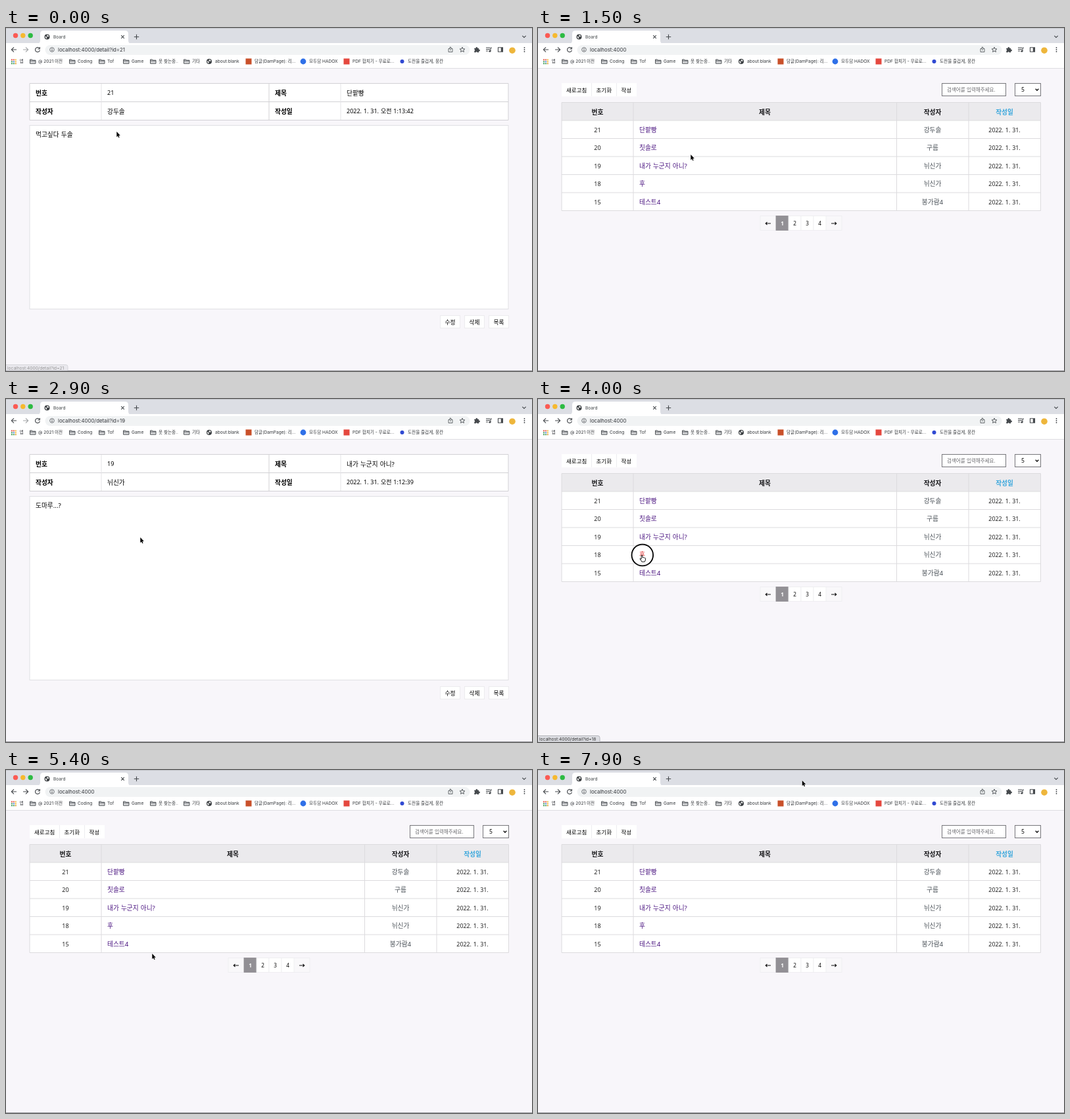
These frames come from a looping animation (800 px wide and 523 px high, 8 s). An HTML page:

```html
<!DOCTYPE html>
<html lang="ko">
<head>
<meta charset="utf-8">
<title>Board</title>
<style>
  html, body { margin: 0; height: 100%; overflow: hidden; background: #f8f6fa; }
  svg { display: block; width: 800px; height: 523px; }
  text { font-family: 'Noto Sans', 'Noto Sans CJK KR', sans-serif; white-space: pre; word-spacing: .06em; }
  .ui { font-family: Inter, 'Noto Sans CJK KR', sans-serif; word-spacing: 0; }
  .line { fill: none; stroke: #45494d; stroke-width: 1.1; }
</style>
</head>
<body>
<svg id="stage" viewBox="0 0 800 523"></svg>
<script>
const LOOP = 8000, STEP = 100;
const posts = [
  { id: 21, title: '단팥빵', author: '강두솔', time: '1:13:42', body: '먹고싶다 두솔' },
  { id: 20, title: '칫솔로', author: '구름', time: '1:13:10', body: '칫솔' },
  { id: 19, title: '내가 누군지 아니?', author: '뉘신가', time: '1:12:39', body: '도마루...?' },
  { id: 18, title: '후', author: '뉘신가', time: '1:12:05', body: '후' },
  { id: 15, title: '테스트4', author: '봉가람4', time: '1:05:47', body: '졸려요4' },
];

// [time, post id], 0 is the list
const visits = [[0, 21], [1000, 0], [2200, 19], [3500, 0], [4200, 18], [4900, 0], [6100, 15], [7500, 0]];
// [shown from, fades at, post id]
const hovers = [[-500, 0, 21], [1900, 2200, 19], [3800, 4300, 18], [5700, 6400, 15]];
const clicks = [800, 2000, 3400, 4000, 4700, 5900, 7300];
// [time, x, y]
const path = [
  [0, 168, 158], [800, 12, 33], [1000, 12, 33], [1500, 232, 193], [1900, 204, 211], [2900, 204, 211],
  [3400, 12, 33], [3500, 12, 33], [3900, 158, 238], [4200, 158, 238], [4700, 12, 33], [4900, 12, 33],
  [5400, 222, 280], [5700, 170, 266], [6300, 170, 266], [6700, 454, 275], [6800, 454, 275],
  [7300, 12, 33], [7450, 12, 33], [7700, 330, 260], [7900, 401.5, 16], [8000, 401.5, 16],
];

const rect = (x, y, w, h, fill, more = '') => `<rect x="${x}" y="${y}" width="${w}" height="${h}" fill="${fill}" ${more}/>`;
const circle = (x, y, r, fill, more = '') => `<circle cx="${x}" cy="${y}" r="${r}" fill="${fill}" ${more}/>`;
const text = (x, y, size, str, more = '') => `<text x="${x}" y="${y}" font-size="${size}" ${more}>${str}</text>`;
const icon = (x, y, d, more = '') => `<path class="line" transform="translate(${x} ${y})" d="${d}" ${more}/>`;
const stroke = (d, color = '#dcdbde') => `<path d="${d}" fill="none" stroke="${color}"/>`;
const BOLD = 'font-weight="700"', MID = 'text-anchor="middle"';

const globe = (x, y) => circle(x, y, 4, '#3c4043') +
  `<path transform="translate(${x} ${y})" d="M-3-1Q-1-1-.5.5T-1 3Q-3 2-3-1ZM0-3Q2-3 3-1L1 0-.5-1Z" fill="#e8e8e8"/>`;
const folder = x => icon(x, 51, 'M.5-3h3l1 1.2h4.5v5h-8.5zM.5-.9h8.5', 'style="stroke-width:.9;fill:#d4d5d7"');

function browser() {
  const folders = [[36, '@ 2021 이전'], [96, 'Coding'], [141, 'Tof'], [178, 'Game'], [219, '옷 찾는중..'], [270, '기타']];
  const marks = [[318, 'about:blank'], [378, '담글(DamPage): 리...'], [461, '모두담 HADOX'],
    [527, 'PDF 합치기 - 무료로...'], [611, '도전을 즐겁게, 뭉칸']];
  const label = ([x, str], dx = 0) => text(x + dx, 53.4, 6.6, str, 'class="ui" fill="#33363a"');
  const dots = ['#e34b3d', '#e34b3d', '#f0b429', '#3d9a54', '#3c7de0', '#f0b429', '#3d9a54', '#3d9a54', '#e0992a'];
  return rect(0, 0, 800, 24, '#dcdee4') + rect(0, 0, 800, 1, '#c4c5ca') +
    rect(0, 23, 800, 38, '#fff') + rect(0, 61, 800, 1, '#dedee2') +
    circle(14.5, 11.5, 3.7, '#fb5b54') + circle(25.8, 11.5, 3.7, '#f6b92f') + circle(37.2, 11.5, 3.7, '#2dbb43') +
    '<path d="M47 24q5 0 5-5V9q0-5 5-5h124q5 0 5 5v10q0 5 5 5z" fill="#fff"/>' +
    globe(62.5, 13.5) + text(72, 16, 6.6, 'Board', 'class="ui" fill="#3c4043"') +
    icon(177.5, 13.5, 'M-2.3-2.3L2.3 2.3M2.3-2.3L-2.3 2.3') +
    icon(198.5, 13.5, 'M-3.7 0h7.4M0-3.7v7.4') + icon(788, 13, 'M-2.7-1.2L0 1.5 2.7-1.2') +
    rect(59.5, 26, 646, 15, '#f1f3f4', 'rx="7.5"') + icon(12, 33, 'M4 0h-7.5M0-3.7L-3.7 0 0 3.7') +
    icon(30, 33, 'M-4 0h7.5M0-3.7L3.7 0 0 3.7', 'id="forward"') +
    icon(48, 33, 'M2.6-2.2A3.5 3.5 0 1 0 3.4 1M3.4-4v3H.4') +
    circle(70, 33, 3.3, 'none', 'stroke="#5f6368" stroke-width=".9"') + icon(70, 33, 'M0-1.9v.9M0-.3v2.2') +
    text(79, 35.9, 7.8, '', 'class="ui" id="url" fill="#303338"') +
    icon(676, 33, 'M-1-1.5h-2v5h6v-5h-2M0 1.5v-5.5M-1.8-2.4L0-4.2 1.8-2.4', 'style="stroke-width:.8"') +
    icon(694, 33, 'M0-3.8L1.1-1.2 3.9-1 1.8.8 2.4 3.5 0 2-2.4 3.5-1.8.8-3.9-1-1.1-1.2Z', 'style="stroke-width:.9"') +
    icon(716, 33, 'M-3.7-2.3h2.3a1.3 1.3 0 1 1 2.5 0h2v2.2a1.3 1.3 0 1 1 0 2.4v1.9h-2.3a1.2 1.2 0 0 0-2.3 0h-2.2v-2.3a1.3 1.3 0 0 0 0-2.4z', 'style="fill:#45494d;stroke:none"') +
    icon(734, 33, 'M-4-3h6M-4-.5h6M-4 2h3.2M3 2.3v-5h2') + circle(735.9, 35.3, 1.5, '#45494d') +
    icon(752, 33, 'M-3.5-3.2h7v6.4h-7z') + rect(752.8, 30, 2.8, 6, '#45494d') +
    circle(770, 34.2, 4.8, '#eeb63c') + [30, 33, 36].map(y => circle(788.5, y, .9, '#45494d')).join('') +
    dots.map((c, i) => rect(8 + i % 3 * 2.9, 47.5 + (i / 3 | 0) * 2.9, 1.9, 1.9, c)).join('') + label([20.5, '앱']) +
    folders.map(f => folder(f[0]) + label(f, 13)).join('') + marks.map(m => label(m)).join('') +
    globe(309, 51) + rect(364.5, 46.5, 9, 9, '#c9502a') + circle(452, 51, 4.4, '#2f70e8') +
    rect(513.5, 46.5, 9, 9, '#e5483f') + circle(602.5, 51, 3, '#3049d2');
}

function list() {
  const centers = [90.5, 345, 600, 709.5];
  const heads = ['번호', '제목', '작성자', '작성일'].map((h, i) =>
    text(centers[i], 131.5, 9.7, h, `${MID} ${BOLD} fill="${i == 3 ? '#39a7dc' : '#151518'}"`)).join('');
  const rows = posts.map((p, i) => {
    const y = 158.8 + 27.5 * i;
    return text(90.5, y - .2, 9, p.id, MID + ' fill="#222"') +
      text(154, y, 9.7, p.title, `id="link${p.id}"`) +
      text(600, y, 9.7, p.author, MID + ' fill="#495057"') +
      text(709.5, y - .2, 8.9, '2022. 1. 31.', MID + ' fill="#222"') +
      stroke(`M36 ${168.5 + 27.5 * i}H764.5`);
  }).join('');
  const pages = [1, 2, 3, 4].map(n => {
    const x = 343 + 19 * n, on = n == 1;
    return rect(x, 286.5, 19, 22, on ? '#929095' : '#fff', `stroke="${on ? '#929095' : '#eeedf0'}" stroke-width=".8"`) +
      text(x + 9.5, 300.8, 8.2, n, `${MID} font-weight="${on ? 700 : 500}" fill="${on ? '#fff' : '#111'}"`);
  }).join('');
  const pageArrow = (x, d) => icon(x, 298, d, 'style="stroke:#111;stroke-width:1.2"');
  return rect(36, 84, 114, 20.5, '#fff') + stroke('M81.5 84v20M119.5 84v20', '#ececef') +
    text(43, 98, 8.5, '새로고침') + text(88.5, 98, 8.5, '초기화') + text(126.5, 98, 8.5, '작성') +
    rect(614.5, 84.5, 97, 19, '#fff', 'stroke="#77777b"') +
    text(622, 97, 7.5, '검색어를 입력해주세요.', 'fill="#68686c"') +
    rect(725.5, 84.5, 39, 19, '#fff', 'stroke="#77777b"') + text(735, 97.4, 8.6, '5') +
    icon(759, 94, 'M-2.3-1.2L0 1.2 2.3-1.2', 'style="stroke:#111;stroke-width:1.4"') +
    rect(36, 113.5, 728.5, 165, '#fff') + rect(36, 113.5, 728.5, 27.5, '#ebeaed') +
    stroke('M36 113.5H764.5V278.5H36ZM36 141H764.5M145 113.5V278.5M545.5 113.5V278.5M655 113.5V278.5') +
    heads + rows + rect(338, 286.5, 124, 22, '#f9f8fa', 'stroke="#eeedf0" stroke-width=".8"') + pages +
    pageArrow(350, 'M4 0h-7M-1.5-2.1L-3.7 0-1.5 2.1') + pageArrow(450, 'M-4 0h7M1.5-2.1L3.7 0 1.5 2.1');
}

function detail(p) {
  const button = (x, str) => rect(x + .5, 438.5, 30, 19, '#fff', 'stroke="#ecebee"') + text(x + 15.5, 451.5, 8.7, str, MID);
  return rect(36, 84.5, 728, 56, '#fff') +
    stroke('M36 84.5H764V140.5H36ZM36 112.5H764M400 84.5V140.5', '#d2d1d5') +
    stroke('M145 85V140M509 85V140', '#e4e3e6') +
    text(45, 102.7, 9.7, '번호', BOLD) + text(154, 102.4, 9, p.id) +
    text(409, 102.7, 9.7, '제목', BOLD) + text(518, 102.7, 9.7, p.title) +
    text(45, 130.7, 9.7, '작성자', BOLD) + text(154, 130.7, 9.7, p.author) +
    text(409, 130.7, 9.7, '작성일', BOLD) + text(518, 130.4, 9, '2022. 1. 31. 오전 ' + p.time) +
    rect(36, 148.5, 728, 280, '#fff', 'stroke="#e0dfe3"') + text(45, 165.9, 9.7, p.body) +
    button(660, '수정') + button(697, '삭제') + button(734, '목록');
}

const $ = id => document.getElementById(id);
$('stage').innerHTML = rect(0, 0, 800, 523, '#f8f6fa') + browser() + '<g id="page"></g>' +
  rect(0, 522, 800, 1, '#9b9ba1') +
  '<g id="status"><path d="M-1 513.5H91q3 0 3 3V523H-1z" fill="#dddee3" stroke="#b4b5ba"/>' +
  text(2, 521, 6.6, '', 'class="ui" id="target" fill="#333"') + '</g>' +
  '<g id="cursor">' + circle(.8, 0, 16.3, 'none', 'id="ring" stroke="#000" stroke-width="1.8"') +
  '<path id="arrow" d="M.3 0V8.2L2.1 6.5 3.3 9.3 4.6 8.7 3.4 6H5.8Z" fill="#000" stroke="#fff" stroke-width=".8" paint-order="stroke"/>' +
  '<path id="hand" d="M-.9 1q0-1 .9-1t.9 1v2.6q1.4-.5 1.8.3 1.2-.3 1.5.5 1.4-.2 1.4 1.2 0 2.7-1.4 4.6H-.2Q-1.2 8-3 5.8q-.2-1.3 2.1.3z" fill="#fff" stroke="#000" stroke-width=".9"/></g>';

let shown = null;
function openPage(id) {
  if (id === shown) return;
  shown = id;
  $('page').innerHTML = id ? detail(posts.find(p => p.id == id)) : list();
  $('url').textContent = 'localhost:4000' + (id ? '/detail?id=' + id : '');
  $('forward').setAttribute('opacity', id ? .5 : 1);
}

function cursorAt(t) {
  const i = path.findIndex(k => k[0] > t), [t0, x0, y0] = path[i - 1], [t1, x1, y1] = path[i];
  const u = (t - t0) / (t1 - t0), e = u * u * (3 - 2 * u);
  return [x0 + (x1 - x0) * e, y0 + (y1 - y0) * e];
}

function draw(t) {
  openPage(visits.findLast(v => v[0] <= t)[1]);
  const [, fade, id] = hovers.findLast(h => h[0] <= t);
  const opacity = t < fade ? 1 : t < fade + STEP ? .5 : 0;
  const onLink = !shown && opacity > 0;
  $('status').setAttribute('opacity', opacity);
  $('target').textContent = 'localhost:4000/detail?id=' + id;
  if (!shown) for (const p of posts)
    $('link' + p.id).setAttribute('fill', onLink && p.id == id ? '#e02020' : '#4b1580');
  $('cursor').setAttribute('transform', `translate(${cursorAt(t)})`);
  $('ring').style.display = clicks.some(c => t >= c && t < c + 2 * STEP) ? '' : 'none';
  $('hand').style.display = onLink ? '' : 'none';
  $('arrow').style.display = onLink ? 'none' : '';
}

function tick() {
  draw(Math.floor(performance.now() % LOOP / STEP) * STEP);
  requestAnimationFrame(tick);
}
tick();
</script>
</body>
</html>
```
